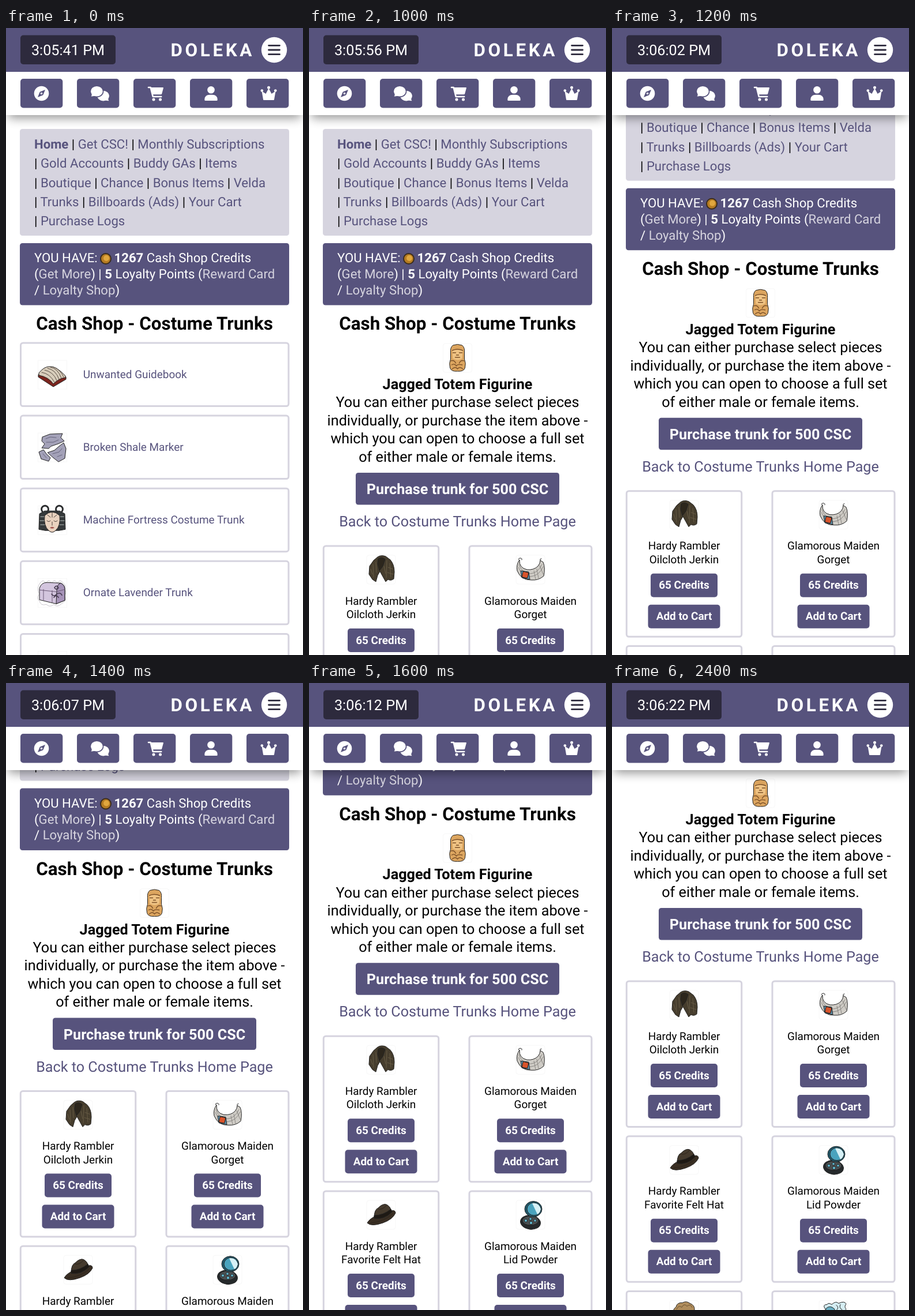
Write an HTML page that moves like this. It is 515 px wide and 1087 px high and loops after 2.8 s.

```html
<!DOCTYPE html>
<html lang="en">
<head>
<meta charset="utf-8">
<title>Costume Trunks</title>
<style>
@property --n { syntax: "<integer>"; inherits: true; initial-value: 0; }
:root { --main: #57537d; --pale: #d6d4df; --dark: #2d2a3d; }
html, body { margin: 0; width: 100%; height: 100%; overflow: hidden; background: #fff; }
svg { display: block; }
#stage {
  width: 100vw; height: 100vh;
  font: 25.2px Roboto, sans-serif; text-rendering: geometricPrecision;
  animation: step 2.8s step-end infinite;
}
@keyframes step {
  0% { --n: 0; }
  35.714% { --n: 1; }
  42.857% { --n: 2; }
  50% { --n: 3; }
  57.143% { --n: 4; }
  64.286% { --n: 5; }
  100% { --n: 5; }
}
#clock { transform: translateY(calc(var(--n) * -60px)); }
#page { transform: translateY(calc(max(var(--n) - 1, 0) * -95.25px)); }
#list { opacity: calc(1 - var(--n)); }
#trunk { opacity: var(--n); }
.b { font-weight: 700; }
.mid { text-anchor: middle; }
.nav { font-size: 22.15px; }
.small { font-size: 18.95px; }
.h { font-size: 31.4px; }
.main { fill: var(--main); }
.pale { fill: var(--pale); }
.white { fill: #fff; }
.dark { fill: var(--dark); }
.card { fill: #fff; stroke: var(--pale); stroke-width: 3; }
.pic { fill: #fff; stroke: #f7f7f7; }
.ink { stroke: #222; stroke-width: 1; stroke-linejoin: round; }
.line { fill: none; stroke-linecap: round; stroke-linejoin: round; }
</style>
</head>
<body>
<svg id="stage" viewBox="0 0 515 1087">
<defs>
  <filter id="soft" x="-10%" y="-50%" width="120%" height="200%"><feGaussianBlur stdDeviation="9"/></filter>

  <g id="book" class="ink">
    <path d="M-24 0 L-6-10 L24 4 L24 8 L2 21 L-24 4Z" fill="#7c241d"/>
    <path d="M-23-3 Q-14-14-5-14 Q6-16 23 2 L23 5 Q12 6 2 16 Q-6 4-23 1Z" fill="#d8cdbb"/>
    <path class="line" d="M-18-4Q-4-2 4 13M-13-8Q2-5 8 10M-8-11Q6-9 12 8M-3-13Q10-11 16 6M3-13Q14-9 20 4" stroke="#574c43"/>
  </g>

  <g id="stone" class="ink" stroke="#34333f" fill="#a3a1b8">
    <path d="M-17-18 L-4-23 L18-24 L15-17 L21-11 L10-6 L-2-2 L-6 2 L-18 1 L-13-6 L-18-11Z"/>
    <path d="M-23 8 L-15 4 L-10 11 L-3 18 L-6 24 L-19 20Z"/>
    <path d="M-8 9 L4 5 L12-2 L20-8 L24 2 L22 19 L11 25 L2 18Z"/>
    <path class="line" d="M-11-15L-3-18L7-17M-10-9L2-9L11-13M-16 11L-10 18M1 11L12 8L17 2M9 16L17 13" stroke="#66647c"/>
  </g>

  <g id="mask" class="ink">
    <path d="M-22-11 L-13-16 L13-16 L22-11 L23 16 L12 18 L-12 18 L-23 16Z" fill="#35393b"/>
    <path class="line" d="M-9-14a6 6 0 1 0-8-1M9-14a6 6 0 1 1 8-1" stroke="#2a2c2e" stroke-width="3"/>
    <path class="line" d="M-20-6h6M-21 1h7M-20 8h7M20-6h-6M21 1h-7M20 8h-7" stroke="#8b9290" stroke-width="1.5"/>
    <path d="M-13-8 Q0-20 13-8 Q15 10 6 18 Q0 24-6 18 Q-15 10-13-8Z" fill="#e9d2bf"/>
    <path class="line" d="M-9 1q3 3 6 0M3 1q3 3 6 0M0-13V-5M0 3V9M-8-9L-3-5M8-9L3-5" stroke="#4b403a"/>
    <path d="M-4 13q4-3 8 0q-4 3-8 0" fill="#a4564f" stroke="none"/>
  </g>

  <g id="chest" class="ink" stroke="#55435f">
    <path class="line" d="M-21-17q5-8 10 0q5-8 10 0q5-8 10 0q5-8 10 0q7 5 2 10q6 6 0 12q6 8-5 14q-7 7-13 1q-7 6-13 0q-10 3-12-6q-6-5 0-12q-6-10 1-19" stroke="#ccc8cf"/>
    <path d="M-22-8 Q-19-18-9-18 L15-17 Q23-13 22-4 L22 13 L7 19 L-22 12Z" fill="#d3c5de"/>
    <path d="M8-4 Q8-15 15-17 Q23-13 22-4 L22 13 L7 19Z" fill="#a693b8"/>
    <path class="line" d="M-22-5L7-2L22-6M-15-6V13M0-4V16" stroke="#6b5876"/>
    <path class="line" d="M4-9q4-6 7 0q-3 6-7 0M-1 2q4 6 9 0q6-4 9 2M3 8q4-6 8 0" stroke="#463a50" stroke-width="1.6"/>
  </g>

  <g id="idol" class="ink" stroke="#6d4522">
    <path d="M-8-22 Q0-25 8-22 Q13-18 12-9 L12 2 Q15 9 13 17 Q11 24 0 23 Q-11 24-13 17 Q-15 9-12 2 L-12-9 Q-13-18-8-22Z" fill="#dca55f"/>
    <path d="M-9-13Q0-17 9-13L8 1Q0 6-8 1Z" fill="#efc384" stroke="none"/>
    <path class="line" d="M-9-13Q0-17 9-13M-8-9h5M3-9h5M-2-5h4M-4-1h8M-11 5Q-6 3-3 9M11 5Q6 3 3 9M-10 12q5-3 8 2q2-4 10-2M-9 19q5-5 9 0q4-5 9 0" stroke="#7d5128" stroke-width="1.4"/>
  </g>

  <g id="coat" class="ink" stroke="#1e1a14">
    <path d="M-6-22 Q0-26 8-23 L16-17 Q23-9 23 4 L22 16 Q17 20 12 17 L8 21 L3 12 L-2 3 L-6 10 L-9 21 L-15 17 L-21 8 L-20-6 L-13-16Z" fill="#463d2d"/>
    <path d="M-5-19Q1-23 7-18L3-6L-3 2L-6-10Z" fill="#2c261c"/>
    <path class="line" d="M-14-9L-13 13M-9-13L-8 5M10-16L9 14M15-11L17 13M5-6L8 7M-18-1L-15 8M12-4L20-1M11 5L21 8" stroke="#665b45"/>
  </g>

  <g id="collar" class="ink" stroke="#44423f">
    <path d="M-19-17 Q-20-3-6 0 Q6 1 13-6 Q17-11 17-16 L22-13 Q26-3 23 11 Q14 19 2 18 Q-16 19-23 2 Q-25-9-19-17Z" fill="#cfccc6"/>
    <path class="line" d="M-20-9Q-16 5 0 7Q13 6 20-9M-21-4Q-15 10 0 12Q15 11 22-5M11-1L14 15M16-7L22 8M6 2L9 17" stroke="#8a8783"/>
    <path d="M-17 2L-3 4L-1 17L-15 14Z" fill="#5c8da6"/>
    <rect x="-14" y="4" width="10" height="10" rx="2" fill="#d9542b" transform="rotate(12 -9 9)"/>
    <path class="line" d="M-19-16q-4-3 1-4q4 0 3 3M17-16q-1-3 2-3"/>
  </g>

  <g id="hat" class="ink" stroke="#18140f">
    <path d="M-24 14 Q-20 7-11 3 L17-7 Q25-9 25-3 Q20 8 3 14 Q-17 21-24 14Z" fill="#392e23"/>
    <path d="M-12 5 Q-12-9-5-12 Q3-20 9-18 Q16-15 18-6 Q4 7-12 5Z" fill="#453a2d"/>
    <path d="M-12 1Q4 1 17-10L19-5Q5 9-12 6Z" fill="#1e1914"/>
    <path class="line" d="M-5-10Q2-8 9-16M-18 14Q4 13 20-2" stroke="#2c241b"/>
  </g>

  <g id="compact" class="ink">
    <ellipse cx="0" cy="13" rx="17.5" ry="12" fill="#25292b" transform="rotate(8 0 13)"/>
    <ellipse cx="0" cy="10" rx="14" ry="8" fill="#4b5052"/>
    <ellipse cx="5" cy="-10" rx="15" ry="13.5" fill="#22586a"/>
    <ellipse cx="6" cy="-10" rx="12" ry="11" fill="#4aa3bd"/>
    <path d="M3-20Q14-22 18-10Q16-2 12-1Z" fill="#d7f1f6" stroke="none"/>
    <g fill="#5fb4cb"><circle cx="-8" cy="10" r="2.6"/><circle cx="0" cy="7" r="2.4"/><circle cx="1" cy="14" r="2.8"/><circle cx="8" cy="10" r="2.4"/></g>
  </g>

  <g id="wig" class="ink" stroke="#5d4526">
    <path d="M-20 8Q-22-8-14-14Q-12-22-3-21Q4-25 10-20Q19-17 18-8Q23 0 19 8Z" fill="#b08d5c"/>
    <path class="line" d="M-13-10q4-8 9-3q4-8 9-2q6-5 9 2" stroke="#6b5230"/>
  </g>

  <g id="lace" class="ink" stroke="#56889a">
    <path d="M-16 8L-14-10Q-20-18-11-18Q-9-22-3-18Q4-25 9-20Q19-25 22-19Q18-14 22-10Q17-6 15 8Z" fill="#d5edf2"/>
    <path d="M-13-11Q-6-18 2-10L1 8H-14Z" fill="#6bb0c4"/>
    <path class="line" d="M5-17q5 4 1 8M12-18q-3 6 3 9"/>
  </g>

  <g id="bubble">
    <ellipse rx="10.4" ry="8.8"/>
    <path d="M-9 4Q-8 7-10 8.5Q-6 9-2 7Z"/>
  </g>
</defs>

<rect width="515" height="1087" fill="#fff"/>

<g id="page">
  <rect class="pale" x="24" y="175" width="467" height="185" rx="4.5"/>
  <g class="nav" id="menu"></g>

  <rect class="main" x="24" y="373" width="467" height="107.5" rx="4.5"/>
  <g class="nav white">
    <text x="49" y="406.3">YOU HAVE:</text>
    <text x="187.5" y="406.3"><tspan class="b">1267</tspan> Cash Shop Credits</text>
    <text x="49" y="434">(<tspan class="pale">Get More</tspan>) | <tspan class="b">5</tspan> Loyalty Points (<tspan class="pale">Reward Card</tspan></text>
    <text x="49" y="461.8">/ <tspan class="pale">Loyalty Shop</tspan>)</text>
  </g>
  <circle cx="173" cy="400" r="9" fill="#b67c22" stroke="#3b2c1c" stroke-width="2"/>
  <circle cx="174" cy="399" r="5" fill="#e0a73e"/>

  <text class="b h mid" x="257.5" y="523.3">Cash Shop - Costume Trunks</text>

  <g id="list"></g>

  <g id="trunk">
    <rect class="pic" x="232.5" y="547" width="50" height="50" rx="4"/>
    <use href="#idol" x="257.5" y="572"/>
    <g class="mid">
      <text class="b" x="257.5" y="626">Jagged Totem Figurine</text>
      <text x="257.5" y="657.3">You can either purchase select pieces</text>
      <text x="257.5" y="688.8">individually, or purchase the item above -</text>
      <text x="257.5" y="720.3">which you can open to choose a full set</text>
      <text x="257.5" y="751.8">of either male or female items.</text>
      <rect class="main" x="81" y="771" width="353" height="55.5" rx="4.5"/>
      <text class="b white" x="257.5" y="808">Purchase trunk for 500 CSC</text>
      <text class="main" x="257.5" y="864">Back to Costume Trunks Home Page</text>
    </g>
    <g id="goods"></g>
  </g>
</g>

<g id="top">
  <rect x="4" y="100" width="507" height="56" fill="#000" opacity=".42" filter="url(#soft)"/>
  <rect class="white" y="70" width="515" height="81"/>
  <rect class="main" width="515" height="76"/>
  <rect class="dark" x="25" y="12.5" width="165" height="50.5" rx="5"/>
  <svg x="25" y="12" width="165" height="51"><g id="clock" class="white mid"></g></svg>
  <text class="b h white" x="285.5" y="48.7" letter-spacing="4.6">DOLEKA</text>
  <circle class="white" cx="465" cy="38" r="22.2"/>
  <path class="line" d="M455.5 30.3h19M455.5 38h19M455.5 45.7h19" stroke="#2d2a3d" stroke-width="2.8"/>

  <g id="tabs"></g>
  <g class="white">
    <circle cx="61.5" cy="113.5" r="12.8"/>
    <path class="main" d="M68 107L64.3 116.3L55 120L58.7 110.7Z"/>
    <circle cx="61.5" cy="113.5" r="1.8"/>

    <use href="#bubble" transform="translate(168.6 117.6) scale(-1 1)"/>
    <ellipse class="main" cx="157.4" cy="109.8" rx="12" ry="10.4"/>
    <use href="#bubble" x="157.4" y="109.8"/>

    <path class="line" d="M247 103h3.7l4 16h14.5" stroke="#fff" stroke-width="2.6"/>
    <path d="M251.5 103H272q1.2 0 .9 1.2l-2.6 9.5q-.4 1.5-2 1.5H254.5z"/>
    <circle cx="256" cy="124" r="2.5"/><circle cx="267.5" cy="124" r="2.5"/>

    <circle cx="355.5" cy="107.3" r="6.3"/>
    <path d="M344.3 124.5q0-8.7 9-8.7h4.4q9 0 9 8.7q0 1.5-1.5 1.5h-19.4q-1.5 0-1.5-1.5z"/>

    <path d="M446 124L443.5 109.5L450.5 114L455.5 104.5L460.5 114L467.5 109.5L465 124Q465 125 464 125H447Q446 125 446 124Z"/>
    <circle cx="443.8" cy="108.5" r="2.3"/><circle cx="455.5" cy="103.3" r="2.5"/><circle cx="467.2" cy="108.5" r="2.3"/>
  </g>
</g>
</svg>

<script>
const fill = (id, items, draw) => {
  document.getElementById(id).innerHTML = items.map(draw).join("");
};

fill("clock", ["05:41", "05:56", "06:02", "06:07", "06:12", "06:22"],
  (t, i) => `<text x="82.5" y="${34.8 + i * 60}">3:${t} PM</text>`);

fill("tabs", [0, 1, 2, 3, 4],
  i => `<rect class="main" x="${25 + i * 98}" y="88" width="73.3" height="50.5" rx="5"/>`);

const menu = [
  ["Home", "Get CSC!", "Monthly Subscriptions"],
  ["Gold Accounts", "Buddy GAs", "Items"],
  ["Boutique", "Chance", "Bonus Items", "Velda"],
  ["Trunks", "Billboards (Ads)", "Your Cart"],
  ["Purchase Logs"]
];
const link = s => `<tspan class="main${s === "Home" ? " b" : ""}">${s}</tspan>`;
fill("menu", menu, (row, i) =>
  `<text x="49" y="${209 + i * 33.25}">${i ? "| " : ""}${row.map(link).join(" | ")}</text>`);

const trunks = [
  ["book", "Unwanted Guidebook"],
  ["stone", "Broken Shale Marker"],
  ["mask", "Machine Fortress Costume Trunk"],
  ["chest", "Ornate Lavender Trunk"],
  ["", ""]
];
fill("list", trunks, ([pic, name], i) => `<g transform="translate(0 ${i * 126.1})">
  <rect class="card" x="25.5" y="546" width="464.5" height="109.5" rx="4"/>
  <rect class="pic" x="55.5" y="576" width="50" height="50"/>
  <use href="#${pic}" x="80" y="601"/>
  <text class="small main" x="133.8" y="607.2">${name}</text></g>`);

const goods = [
  ["coat", "Hardy Rambler", "Oilcloth Jerkin"],
  ["collar", "Glamorous Maiden", "Gorget"],
  ["hat", "Hardy Rambler", "Favorite Felt Hat"],
  ["compact", "Glamorous Maiden", "Lid Powder"],
  ["wig", "", ""],
  ["lace", "", ""]
];
const button = (y, w, s) => `<rect class="main" x="${-w / 2}" y="${y}" width="${w}" height="41" rx="5"/>
  <text class="b white" y="${y + 26.7}">${s}</text>`;
fill("goods", goods, ([pic, a, b], i) => {
  const right = i % 2, w = right ? 212 : 199.5;
  return `<g class="small mid" transform="translate(${right ? 384 : 125} ${896.5 + (i >> 1) * 268.75})">
  <rect class="card" x="${-w / 2}" y="1.5" width="${w}" height="252.5" rx="4"/>
  <rect class="pic" x="-25" y="17.5" width="50" height="50" rx="4"/>
  <use href="#${pic}" y="42.5"/>
  <text y="103">${a}</text><text y="126.7">${b}</text>
  ${button(144.5, 116, "65 Credits")}${button(198.5, 125, "Add to Cart")}</g>`;
});
</script>
</body>
</html>
```
